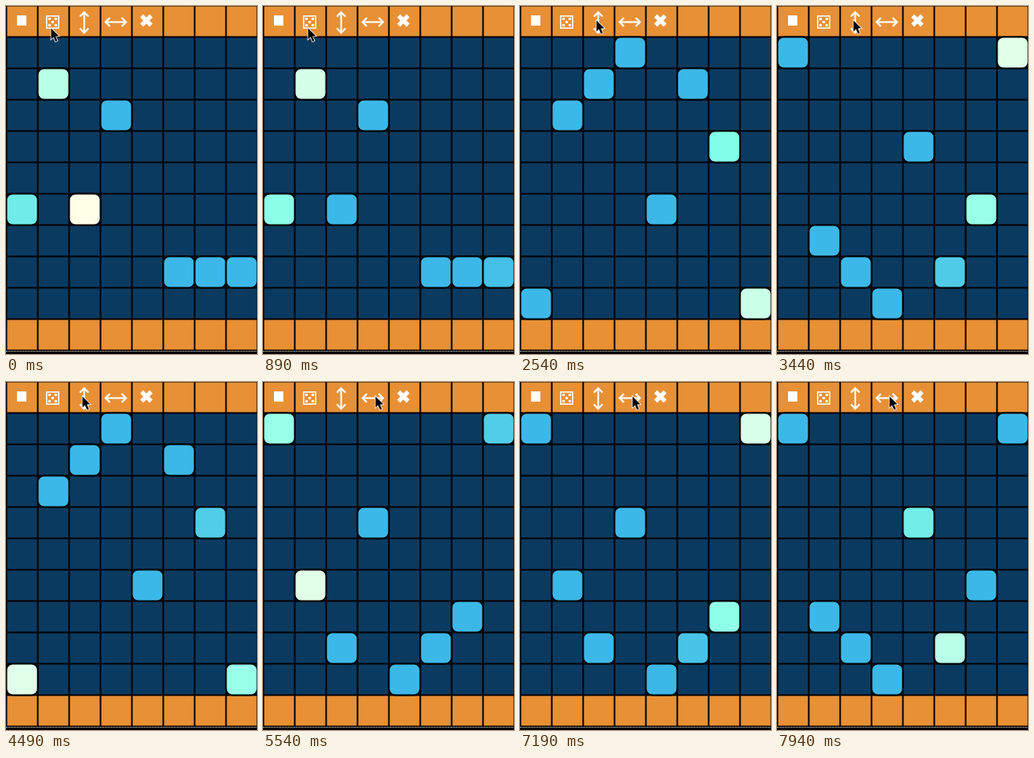
Recreate the animation shown at these times as an HTML page with a canvas. Size 320 by 444 pixels, loop 8 s.

```html
<!DOCTYPE html>
<html lang="en">
<head>
<meta charset="utf-8">
<title>Grid sequencer</title>
<style>
html, body { margin: 0; width: 100%; height: 100%; overflow: hidden; background: #000; }
canvas { display: block; }
</style>
</head>
<body>
<canvas id="stage" width="320" height="444"></canvas>
<script>
const ctx = document.getElementById('stage').getContext('2d');
const LOOP = 8000, STEP = 116.8, COLS = 8, CELL = 40;

// Row of the tile in each column; 0 means none
const start = [6, 2, 6, 3, 0, 8, 8, 8];
const shuffled = [9, 3, 2, 1, 6, 2, 4, 9];
const flipRows = rows => rows.map(r => 10 - r);
const flipCols = rows => [...rows].reverse();
const clicks = [
  [1340, () => shuffled],
  [2690, flipRows], [3740, flipRows], [4640, flipRows],
  [5390, flipCols], [6140, flipCols], [6890, flipCols], [7490, flipCols]
];

// Cursor trips: begin, end, from, to
const trips = [
  [1990, 2490, [57, 28], [97, 18]],
  [4790, 5240, [97, 18], [143, 18]]
];

function cursorAt(t) {
  let pos = trips[0][2];
  for (const [a, b, from, to] of trips) {
    if (t < a) break;
    const k = Math.min(1, (t - a) / (b - a));
    pos = from.map((v, i) => v + (to[i] - v) * k);
  }
  return pos;
}

function rect(color, x, y, w, h) {
  ctx.fillStyle = color;
  ctx.fillRect(x, y, w, h);
}

function line(width, ...points) {
  ctx.lineWidth = width;
  ctx.beginPath();
  points.forEach(([x, y], i) => i ? ctx.lineTo(x, y) : ctx.moveTo(x, y));
  ctx.stroke();
}

function drawGrid() {
  rect('#000', 0, 0, 320, 444);
  rect('#0b3a60', 0, 39, 320, 361);
  rect('#e89035', 0, 0, 320, 39);
  rect('#e89035', 0, 400, 320, 39);
  ctx.strokeStyle = '#000';
  for (let c = 0; c <= COLS; c++) line(2, [c * CELL + .5, 0], [c * CELL + .5, 440]);
  for (let r = 0; r <= 11; r++) line(2, [0, r * CELL - .5], [320, r * CELL - .5]);
  for (let x = 0; x < 320; x += 2) rect('#fff', x, 440, 1, 1);
}

function drawArrow(x, y, angle) {
  ctx.save();
  ctx.translate(x, y);
  ctx.rotate(angle);
  line(2.2, [-12.5, 0], [12.5, 0]);
  for (const s of [-1, 1]) line(2.4, [s * 7.5, -5.5], [s * 13, 0], [s * 7.5, 5.5]);
  ctx.restore();
}

function drawIcons() {
  ctx.strokeStyle = '#fff';
  rect('#fff', 14, 12, 12, 13);
  ctx.lineWidth = 1.6;
  ctx.strokeRect(51.8, 12.8, 15.4, 15.4);
  for (const [x, y] of [[55.5, 16.5], [63.5, 16.5], [59.5, 20.5], [55.5, 24.5], [63.5, 24.5]]) {
    ctx.fillStyle = '#fff';
    ctx.beginPath();
    ctx.arc(x, y, 1.8, 0, 7);
    ctx.fill();
  }
  drawArrow(99.7, 21, Math.PI / 2);
  drawArrow(140, 20.5, 0);
  line(5.4, [173, 12.5], [185, 24.5]);
  line(5.4, [185, 12.5], [173, 24.5]);
}

function drawTile(col, row, age) {
  const glow = Math.max(0, 196 - 72 * age);
  ctx.fillStyle = `rgb(${Math.min(255, 60 + glow)}, ${Math.min(255, 184 + glow)}, 232)`;
  ctx.strokeStyle = '#000';
  ctx.lineWidth = 2;
  ctx.beginPath();
  ctx.roundRect(col * CELL + .5, row * CELL - .5, CELL, CELL, 8);
  ctx.fill();
  ctx.stroke();
}

function drawCursor([x, y]) {
  ctx.save();
  ctx.translate(x, y);
  ctx.beginPath();
  for (const [px, py] of [[.5, .5], [.5, 14.5], [3.7, 11.6], [6.2, 17.4], [8.6, 16.4], [6.1, 10.7], [10.3, 10.3]])
    ctx.lineTo(px, py);
  ctx.closePath();
  ctx.strokeStyle = '#fff';
  ctx.lineWidth = 1.6;
  ctx.stroke();
  ctx.fillStyle = '#000';
  ctx.fill();
  ctx.restore();
}

function draw(now) {
  // The picture refreshes every 150 ms
  const time = now % LOOP;
  const t = time < 140 ? 0 : 140 + 150 * Math.floor((time - 140) / 150);
  const rows = clicks.reduce((state, [at, act]) => t >= at ? act(state) : state, start);
  const beat = 2 + t / STEP;
  drawGrid();
  drawIcons();
  rows.forEach((row, col) => row && drawTile(col, row, (beat - col + COLS) % COLS));
  drawCursor(cursorAt(t));
}

const began = performance.now();
function tick() {
  draw(performance.now() - began);
  requestAnimationFrame(tick);
}
tick();
</script>
</body>
</html>
```
